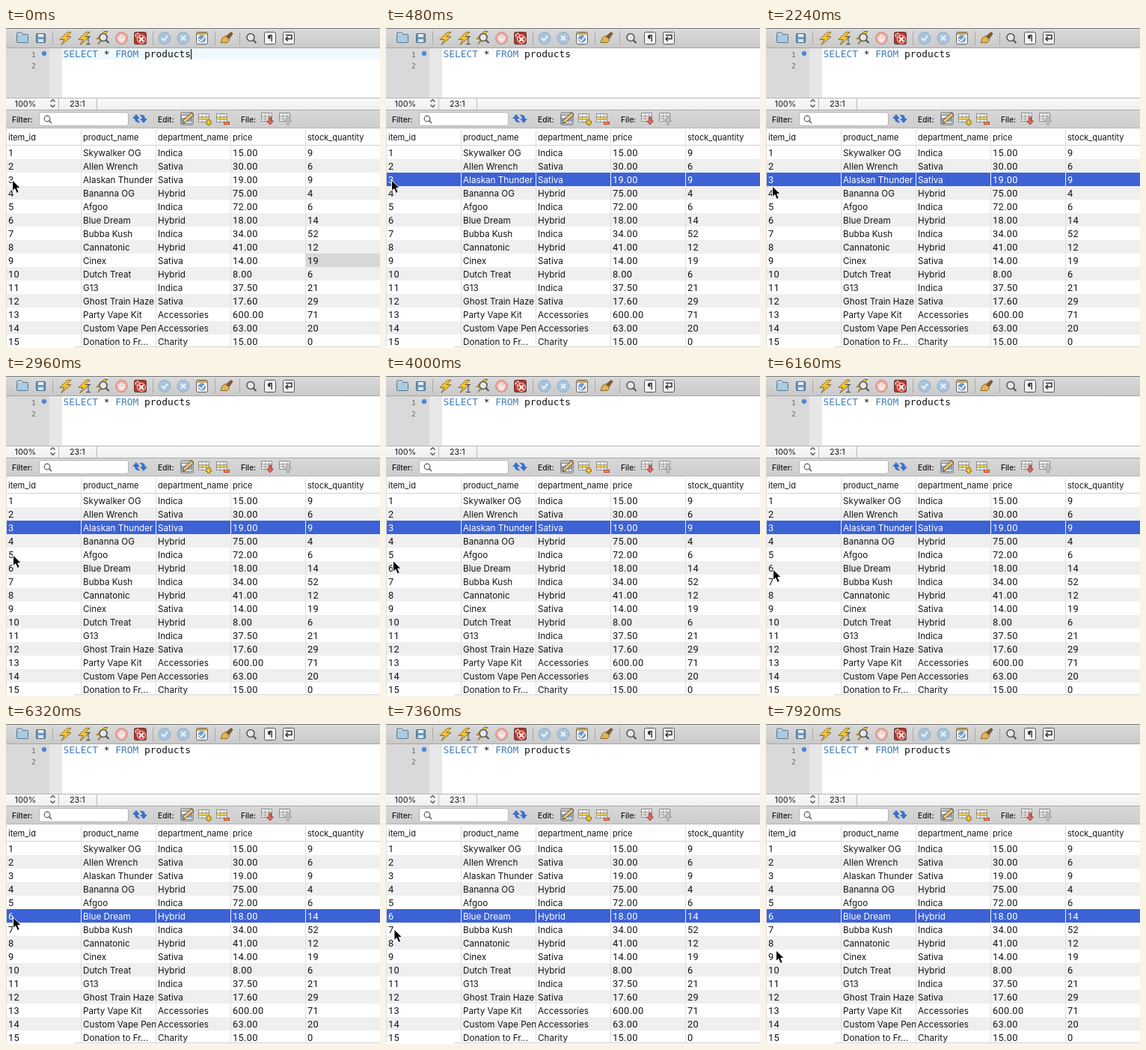
These frames come from a looping animation (500x427 px, 8000 ms). An HTML page with a canvas:

```html
<!DOCTYPE html>
<html lang="en">
<head>
<meta charset="utf-8">
<title>Query result grid</title>
<style>
html, body { margin: 0; width: 100%; height: 100%; overflow: hidden; background: #fff; }
canvas { display: block; }
</style>
</head>
<body>
<canvas id="stage" width="500" height="427"></canvas>
<script>
const ctx = document.getElementById('stage').getContext('2d');
const LOOP = 8000, STEP = 80;
const FIRST_CLICK = 240, SECOND_CLICK = 6240;
const ROW_TOP = 157, ROW_HEIGHT = 18;
const UI = 'Inter, sans-serif', DIGITS = 'Roboto, sans-serif', MONO = '"DejaVu Sans Mono", monospace';

const columns = ['item_id', 'product_name', 'department_name', 'price', 'stock_quantity'];
const rows = `Skywalker OG|Indica|15.00|9
Allen Wrench|Sativa|30.00|6
Alaskan Thunder|Sativa|19.00|9
Bananna OG|Hybrid|75.00|4
Afgoo|Indica|72.00|6
Blue Dream|Hybrid|18.00|14
Bubba Kush|Indica|34.00|52
Cannatonic|Hybrid|41.00|12
Cinex|Sativa|14.00|19
Dutch Treat|Hybrid|8.00|6
G13|Indica|37.50|21
Ghost Train Haze|Sativa|17.60|29
Party Vape Kit|Accessories|600.00|71
Custom Vape Pen|Accessories|63.00|20
Donation to Fr...|Charity|15.00|0`.split('\n').map((line, i) => [i + 1, ...line.split('|')]);

// time, x, y of the pointer tip
const pointerKeys = [
  [0, 8, 203], [80, 8, 203], [240, 7, 203], [2000, 7, 203], [2240, 8, 211], [2880, 9, 239],
  [3680, 9, 239], [4480, 9, 258], [7040, 9, 258], [7920, 13, 302], [8000, 13, 302]
];

function rect(x, y, w, h, color) {
  ctx.fillStyle = color;
  ctx.fillRect(x, y, w, h);
}

function text(str, x, y, size, color = '#141414', family = UI, weight = 400) {
  ctx.font = `${weight} ${size}px ${family}`;
  ctx.letterSpacing = family === DIGITS ? '0.35px' : '0px';
  ctx.fillStyle = color;
  ctx.fillText(str, x, y);
}

function shape(d, x, y, fill, stroke, width = 1) {
  const path = new Path2D(d);
  ctx.save();
  ctx.translate(x, y);
  if (fill) { ctx.fillStyle = fill; ctx.fill(path); }
  if (stroke) { ctx.strokeStyle = stroke; ctx.lineWidth = width; ctx.stroke(path); }
  ctx.restore();
}

function disc(x, y, r, fill, stroke, width = 1) {
  ctx.beginPath();
  ctx.arc(x, y, r, 0, 7);
  if (fill) { ctx.fillStyle = fill; ctx.fill(); }
  if (stroke) { ctx.strokeStyle = stroke; ctx.lineWidth = width; ctx.stroke(); }
}

function box(x, y, w, h, r, fill, stroke) {
  ctx.beginPath();
  ctx.roundRect(x, y, w, h, r);
  ctx.fillStyle = fill;
  ctx.fill();
  ctx.strokeStyle = stroke;
  ctx.lineWidth = 1;
  ctx.stroke();
}

function bar(y, h, top, bottom) {
  const shade = ctx.createLinearGradient(0, y, 0, y + h);
  shade.addColorStop(0, top);
  shade.addColorStop(1, bottom);
  rect(0, y, 500, h, shade);
}

function lens(x, y, r, color) {
  disc(x, y, r, '#e6e6e6', color, 1.5);
  shape(`M${r * .7} ${r * .7}l4 4`, x, y, null, color, 2.2);
}

const CHECK = 'M-4 0l3 3 5-6', CROSS = 'M-3-3L3 3M3-3L-3 3';
const bolt = (x, y) => shape('M3-8L-7 2H-1L-5 9 8-2H2L8-8Z', x, y, '#f5c431', '#8a6a25');

function table(x, y, band) {
  box(x - 8.5, y - 6.5, 14, 11, 0, '#f4f4f4', '#8a8a8a');
  rect(x - 8, y - 3, 13, 4, band);
  shape('M-8-3H5M-8 1H5M-4-6V4M1-6V4', x + .5, y + .5, null, '#999', .8);
}

function drawToolbar() {
  bar(0, 27, '#dadada', '#c9c9c9');
  rect(0, 0, 500, 1, '#777');
  rect(0, 26, 500, 1, '#a5a5a5');
  [62, 196, 279, 312].forEach(x => rect(x, 4, 1, 19, '#a9a9a9'));

  box(14.5, 8.5, 15, 11, 1, '#a9cbe2', '#55758c');
  shape('M0 0V-3H6L8 0', 15, 9, '#c5ddeb', '#55758c');
  box(40.5, 7.5, 12, 12, 1, '#6f97bc', '#456886');
  rect(43, 8, 7, 4, '#e6eef5');
  rect(43, 15, 7, 4, '#dce5ec');

  bolt(79, 13.5);
  bolt(104, 13.5);
  shape('M0 0H6M3 0V10M0 10H6', 107, 11.5, null, '#444');
  bolt(128, 12.5);
  lens(130, 12.5, 5, '#555');
  disc(154.5, 13.5, 8, '#eba49b', '#d58d84');
  shape('M-4 1V-3M-1.3 0V-5M1.3 0V-5M4 1V-3M-4 0Q-3 5 0 5T4 0', 154.5, 13.5, '#fbe8e4', '#fbe8e4', 2);
  box(171.5, 5.5, 16, 16, 2, '#b8342a', '#5d3a35');
  disc(176, 10, 3.5, '#e9dedb');
  shape(CROSS, 176, 10, null, '#b8342a', 1.3);
  disc(181, 15, 5.5, '#c93e32', '#f2e4e2');
  shape(CROSS, 181, 15, null, '#fff', 1.8);

  disc(212, 13.5, 8, '#a8c4dd', '#90acc6');
  shape(CHECK, 212, 13.5, null, '#eef4f9', 2);
  disc(237, 13.5, 8, '#a8c4dd', '#90acc6');
  shape(CROSS, 237, 13.5, null, '#eef4f9', 2);
  box(254.5, 5.5, 15, 16, 2, '#eee', '#666');
  rect(255, 6, 14, 3, '#c5a65e');
  disc(262, 14.5, 5, '#6e9ac8');
  shape(CHECK, 262, 14.5, null, '#fff', 1.7);

  shape('M6-8L8-6 3 1-1-2Z', 295, 13.5, '#8a5a30', '#68472c');
  shape('M-2-3L4 2 1 6-8 6-6 0Z', 295, 13.5, '#dfb64f', '#8e682a');
  lens(327, 12.5, 5, '#555');
  [353, 378].forEach(x => box(x - 7.5, 5.5, 15, 16, 2, '#f2f2f2', '#555'));
  text('¶', 349.5, 18, 12, '#333', UI, 700);
  shape('M-4-3H4V2H-4M-1-1L-4 2-1 5', 378, 12.5, null, '#333', 1.5);
}

function drawEditor(focused) {
  rect(0, 27, 500, 66, '#fff');
  rect(0, 27, 58, 66, '#d9d9d9');
  rect(58, 27, 17, 66, '#e7e7e7');
  if (focused) rect(75, 27, 425, 15, '#eff8fc');
  text('1', 34, 39, 9.5, '#666', MONO);
  text('2', 34, 54, 9.5, '#666', MONO);
  disc(51, 34, 2.8, '#4f8be0', '#3971c5', .7);
  const size = 12.88, advance = size * .602;
  [['SELECT', 0, '#427fb8'], ['*', 7, '#111'], ['FROM', 9, '#427fb8'], ['products', 14, '#111']]
    .forEach(([word, column, color]) => text(word, 76.5 + column * advance, 39, size, color, MONO));
  if (focused) rect(247, 28, 1, 14, '#000');

  bar(93, 16, '#fafafa', '#efefef');
  rect(0, 93, 500, 1, '#b4b4b4');
  rect(70, 94, 1, 15, '#bbb');
  rect(121, 94, 1, 15, '#bbb');
  text('100%', 11.5, 105, 10.8);
  text('23:1', 85, 105, 10.8);
  shape('M-3-2L0-5 3-2M-3 2L0 5 3 2', 62.5, 100.5, null, '#444', 1.2);
}

function drawFilterBar() {
  bar(109, 25, '#d8d8d8', '#cdcdcd');
  rect(0, 109, 500, 1, '#aaa');
  text('Filter:', 8, 125.5, 10.2, '#141414', UI, 500);
  text('Edit:', 203, 125.5, 10.2, '#141414', UI, 500);
  text('File:', 314, 125.5, 10.2, '#141414', UI, 500);
  box(44.5, 112.5, 119, 18, 3, '#fff', '#b3b3b3');
  disc(55, 121, 3.8, null, '#555', 1.2);
  shape('M0 0L3.5 3.5', 57.5, 123.5, null, '#555', 1.5);

  shape('M-8 0L-3-6 2 0H-1Q-1 3 3 5-5 6-5 0Z', 177, 121, '#3a6fd0');
  shape('M8 0L3 6-2 0H1Q1-3-3-5 5-6 5 0Z', 181, 121, '#3a6fd0');

  box(233.5, 112.5, 17, 17, 2, '#c2c2c2', '#8c8c8c');
  table(243, 123, '#86aad0');
  shape('M5-8L8-5-3 5-7 6-6 2Z', 243, 121, '#ecc46c', '#3e444c');
  table(266, 121, '#f4cf3e');
  table(290, 121, '#f4cf3e');
  shape('M-4 0H4M0-4V4', 271, 126, null, '#a67b12', 4);
  shape('M-3 0H3M0-3V3', 271, 126, null, '#f6ca3e', 2);
  shape('M-4 0H4', 295, 127, null, '#b6492d', 4);
  shape('M-3 0H3', 295, 127, null, '#f08a4b', 2);

  table(350, 120, '#dcdcdc');
  shape('M-1.5-4H1.5V1H4.5L0 6-4.5 1H-1.5Z', 353, 123, '#e2695b', '#a0453c');
  table(374, 120, '#dcdcdc');
  shape('M-1.5 6H1.5V1H4.5L0-4-4.5 1H-1.5Z', 377, 123, '#c4c4c4', '#999');
  rect(0, 133, 500, 1, '#b5b5b5');
}

function drawGrid(selected, cellActive) {
  rect(0, 134, 500, 293, '#fff');
  columns.forEach((name, i) => text(name, 3 + i * 100, 149.5, 11));
  rect(0, 156, 500, 1, '#d2d2d2');
  rows.forEach((row, i) => {
    const y = ROW_TOP + i * ROW_HEIGHT, active = row[0] === selected;
    if (active) rect(0, y, 500, ROW_HEIGHT, '#3c62d5');
    else if (i % 2) rect(0, y, 500, ROW_HEIGHT, '#efefef');
    if (cellActive && i === 8) rect(401, y, 99, ROW_HEIGHT, '#d7d7d7');
    row.forEach((value, c) => {
      const isText = c === 1 || c === 2;
      text(value, 3 + c * 100, y + 14, isText ? 11.7 : 12.8, active ? '#fff' : '#141414', isText ? UI : DIGITS);
    });
  });
  for (let x = 100; x < 500; x += 100) {
    rect(x, 136, 1, 290, '#dedede');
    if (selected) rect(x, ROW_TOP + (selected - 1) * ROW_HEIGHT, 1, ROW_HEIGHT, '#eef1fc');
  }
  rect(0, 134, 1, 293, '#ddd');
  rect(0, 425, 500, 2, '#fff');
  rect(91, 425, 409, 1, '#cfcfcf');
}

function drawPointer(t) {
  const next = pointerKeys.findIndex(key => key[0] > t);
  const [t0, x0, y0] = pointerKeys[next - 1], [t1, x1, y1] = pointerKeys[next];
  const k = (t - t0) / (t1 - t0);
  shape('M0 0V14.5L3.3 11.5 5.9 17.4 8.7 16.2 6.2 10.5H10.7Z',
    x0 + (x1 - x0) * k + .5, y0 + (y1 - y0) * k, '#000', '#fff');
}

function draw(now) {
  const t = Math.floor(now % LOOP / STEP) * STEP;
  const focused = t < FIRST_CLICK;
  drawToolbar();
  drawEditor(focused);
  drawFilterBar();
  drawGrid(focused ? 0 : t < SECOND_CLICK ? 3 : 6, focused);
  drawPointer(t);
}

const start = performance.now();
function tick() {
  draw(performance.now() - start);
  requestAnimationFrame(tick);
}
tick();
</script>
</body>
</html>
```
